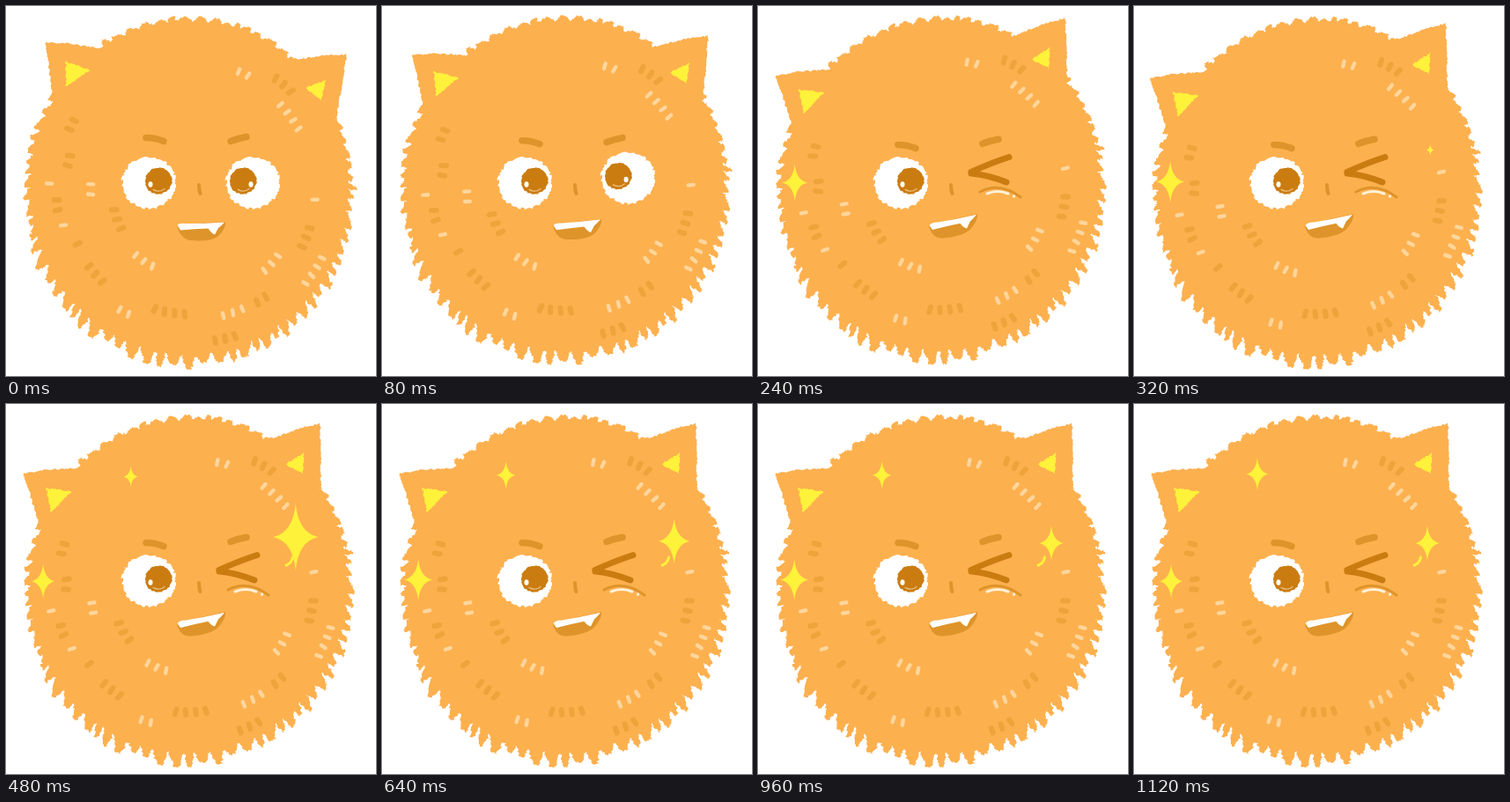
Animation of 420x420 px, one loop 1280 ms. Source, as an HTML page with a canvas:

```html
<!DOCTYPE html>
<html lang="en">
<head>
<meta charset="utf-8">
<title>Winking furball</title>
<style>
html, body { margin: 0; width: 100%; height: 100%; overflow: hidden; background: #fff; }
canvas { display: block; width: 100vw; height: 100vh; }
</style>
</head>
<body>
<canvas id="stage" width="420" height="420"></canvas>
<script>
const ctx = document.getElementById('stage').getContext('2d');
const LOOP = 1280, STEP = 40, WINK = 200, TAU = Math.PI * 2;
const FUR = '#fdb04e', DARK = '#efa33a', LIGHT = '#fdd69c', BROW = '#de942a',
      BROWN = '#cb7c10', YELLOW = '#fff23a', WHITE = '#fff';

let seed = 11;
const rnd = () => {
  seed = (seed * 16807) % 2147483647;
  return seed / 2147483647;
};
const jitter = a => (rnd() * 2 - 1) * a;
const clamp = v => Math.max(0, Math.min(1, v));
const ramp = (t, from, ms) => clamp((t - from) / ms);
const bump = u => Math.sin(Math.PI * u);
const wave = (t, peak, period) => Math.cos((t - peak) / period * TAU);

// Closed polygon with a crayon-like uneven edge
function rough(pts, amp, step = 2) {
  const path = new Path2D();
  pts.forEach(([x, y], i) => {
    const [nx, ny] = pts[(i + 1) % pts.length];
    const n = Math.max(1, Math.round(Math.hypot(nx - x, ny - y) / step));
    for (let k = 0; k < n; k++) {
      path.lineTo(x + (nx - x) * k / n + jitter(amp), y + (ny - y) * k / n + jitter(amp));
    }
  });
  path.closePath();
  return path;
}

function roughOval(rx, ry, amp) {
  const pts = [];
  for (let a = 0; a < TAU; a += TAU / 48) pts.push([Math.cos(a) * rx, Math.sin(a) * ry]);
  return rough(pts, amp);
}

// Tufts around an oval: longer towards the bottom, leaning downwards at the sides
function furball(cx, cy, rx, ry) {
  const pts = [];
  const at = (a, out) => pts.push([cx + Math.cos(a) * (rx + out), cy + Math.sin(a) * (ry + out)]);
  let a = 0;
  while (a < TAU - 0.04) {
    const w = Math.min(0.055 + rnd() * 0.05, TAU - a);
    const low = clamp(Math.sin(a) + 0.2);
    const len = (5 + low * 6) * (0.5 + rnd() * 0.8);
    const tip = a + w * (0.5 + Math.cos(a) * 0.42);
    at(a, -1 - low * 3);
    at(tip - w * 0.16, len);
    at(tip + w * 0.16, len);
    a += w;
  }
  return pts;
}

const body = rough(furball(208, 208, 182, 192), 1.4, 1.6);
const leftEar = rough([[45, 41], [75, 43], [104, 48], [130, 70], [85, 140], [53, 104]], 1);
const rightEar = rough([[387, 55], [360, 56], [324, 62], [300, 70], [330, 130], [375, 128]], 1);
const leftInner = rough([[68, 63], [95, 73], [68, 91]], 1);
const rightInner = rough([[339, 93], [363, 84], [358, 107]], 1);
const eyeWhite = roughOval(30.5, 29.5, 1.5);
const iris = roughOval(15.2, 15.2, 0.8);

// Groups of fur strokes on rings: middle angle, radius, count
const darkRows = [
  [209, 155, 2], [194, 143, 2], [174, 153, 2], [159, 90, 3], [155, 142, 1], [139, 144, 3],
  [100, 140, 4], [77, 172, 3], [57, 147, 2], [22, 141, 3], [-49, 160, 3]
];
const lightRows = [
  [183, 161, 1], [181, 114, 2], [165, 150, 1], [124, 96, 3], [119, 157, 2], [71, 146, 3],
  [42, 123, 3], [33, 167, 4], [4, 141, 1], [-66, 146, 2], [-37, 141, 4]
];

// Each stroke points away from the middle
function strokes(rows) {
  const path = new Path2D(), gap = 11.5;
  for (const [deg, r, n] of rows) {
    for (let i = 0; i < n; i++) {
      const a = deg * TAU / 360 + (i - (n - 1) / 2) * gap / r;
      const x = 210 + Math.cos(a) * r, y = 210 + Math.sin(a) * r;
      const lean = a + jitter(0.2);
      const dx = Math.cos(lean) * 3, dy = Math.sin(lean) * 3;
      path.moveTo(x - dx, y - dy);
      path.lineTo(x + dx, y + dy);
    }
  }
  return path;
}
const darkFur = strokes(darkRows), lightFur = strokes(lightRows);

const stars = [
  { x: 42, y: 201, born: 200, grow: 50, size: t => 47 + 8 * wave(t, 800, 640) },
  { x: 139.6, y: 79, born: 440, grow: 64, size: t => 34 + 3 * wave(t, 800, 320) },
  { x: 333, y: 158, born: 280, grow: 160, size: t => 40 + 35 * clamp(1 - Math.abs(t - 480) / 240) }
];

function fill(path, color, x = 0, y = 0) {
  ctx.save();
  ctx.translate(x, y);
  ctx.fillStyle = color;
  ctx.fill(path);
  ctx.restore();
}

function stroke(shape, color, width) {
  ctx.strokeStyle = color;
  ctx.lineWidth = width;
  ctx.stroke(typeof shape === 'string' ? new Path2D(shape) : shape);
}

function oval(x, y, rx, ry, color) {
  ctx.fillStyle = color;
  ctx.beginPath();
  ctx.ellipse(x, y, rx, ry, 0, 0, TAU);
  ctx.fill();
}

function drawStar(s, t) {
  const h = s.size(t) * ramp(t, s.born, s.grow);
  if (h < 1) return;
  const v = h / 2, w = h * 0.34, k = 0.13;
  ctx.save();
  ctx.translate(s.x - (h - 40) * 0.12, s.y - (h - 40) * 0.2);
  ctx.fillStyle = YELLOW;
  ctx.beginPath();
  ctx.moveTo(0, -v);
  ctx.quadraticCurveTo(w * k, -v * k, w, 0);
  ctx.quadraticCurveTo(w * k, v * k, 0, v);
  ctx.quadraticCurveTo(-w * k, v * k, -w, 0);
  ctx.quadraticCurveTo(-w * k, -v * k, 0, -v);
  ctx.fill();
  ctx.restore();
}

// side: 1 looks right, -1 looks left
function drawEye(x, y, side) {
  const ix = x + 11 * side, iy = y - 2;
  fill(eyeWhite, WHITE, x, y);
  fill(iris, BROWN, ix, iy);
  ctx.beginPath();
  ctx.arc(ix, iy, 11.5, 0.9, 2.1);
  ctx.strokeStyle = '#e9bd80';
  ctx.lineWidth = 1.3;
  ctx.stroke();
  oval(x + 2 * side, y + 2, 2.5, 3.3, WHITE);
}

function drawWink() {
  stroke('M242 188.5 Q262 179 285 171.5', BROWN, 7);
  stroke('M242 190 Q262 192 282 200', BROWN, 7);
  stroke('M252 211 Q274 199 298 217', BROW, 3);
  stroke('M260 213 Q272 208 284 213', '#fff1d8', 3);
  oval(290.5, 216, 1.7, 1.7, '#fff1d8');
}

function drawMouth(lift) {
  const slope = lift / 54;
  ctx.save();
  ctx.transform(1, slope, 0, 1, 0, -195 * slope);
  fill(new Path2D('M194 249 Q222 246 249 245 Q250 253 240 262 Q230 268 212 266 Q198 266 194 249Z'), BROW);
  fill(new Path2D('M194.5 249 Q196 246 204 247 Q225 247 248 245.5 Q245 249 241 252 L237 259.5 Q233 258 229.5 252.5 Q214 253 198 254.5Z'), WHITE);
  ctx.restore();
}

// Tilts to the left with a small hop and overshoot
function drawBody(t) {
  const hop = bump(ramp(t, 0, 330)) ** 2;
  const turn = 0.207 * ramp(t, 0, 170) + 0.022 * bump(ramp(t, 140, 240));
  const c = Math.cos(turn), s = Math.sin(turn);
  ctx.save();
  ctx.translate(210, 210);
  ctx.transform(c, -s, s * 0.83, c - 0.02 * hop, 0, -6 * hop);
  ctx.translate(-210, -210);
  fill(leftEar, FUR, 5 * hop, -3 * hop);
  fill(rightEar, FUR, -6 * hop, -8 * hop);
  fill(body, FUR);
  fill(leftInner, YELLOW, 5 * hop, -3 * hop);
  fill(rightInner, YELLOW, -6 * hop, -8 * hop);
  stroke(darkFur, DARK, 6);
  stroke(lightFur, LIGHT, 4.4);
  ctx.restore();
}

function drawFace(t) {
  const brow = 8 * ramp(t, 0, 200), rise = 11 * ramp(t, 0, 160);
  const left = 149.5 + brow, right = 148.5 + brow * 0.35;
  stroke(`M159 ${left} Q169 ${left} 179 ${left + 4}`, BROW, 7.5);
  stroke(`M255 ${right + 5} Q264 ${right + 1.5} 273 ${right}`, BROW, 7.5);
  drawEye(162, 200.5, 1);
  if (t < WINK) drawEye(280 - rise * 0.17, 200.5 - rise, -1);
  else drawWink();
  stroke('M219 203 Q219 209 220.5 213', BROW, 4);
  drawMouth(-9 * ramp(t, 0, 220));
}

function draw(t) {
  ctx.fillStyle = WHITE;
  ctx.fillRect(0, 0, 420, 420);
  ctx.lineCap = ctx.lineJoin = 'round';
  drawBody(t);
  drawFace(t);
  if (t >= 360) stroke('M318 183 Q324 181 325.5 174', YELLOW, 3);
  stars.forEach(s => drawStar(s, t));
}

function tick() {
  const t = performance.now() % LOOP;
  draw(Math.floor(t / STEP) * STEP);
  requestAnimationFrame(tick);
}
tick();
</script>
</body>
</html>
```
